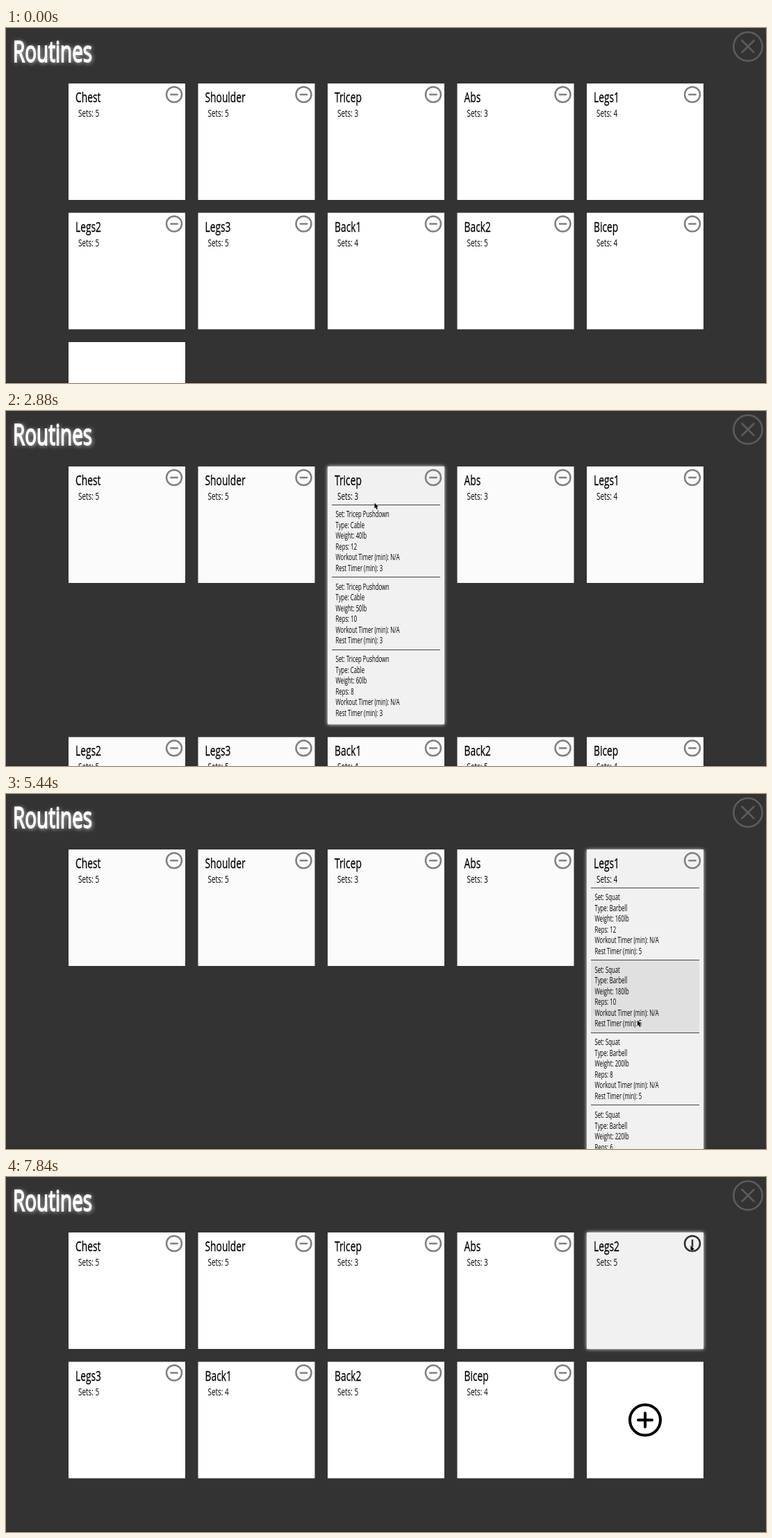
Write an HTML page with a canvas that moves like this. It is 1094 px wide and 512 px high and loops after 8 s.

```html
<!DOCTYPE html>
<html lang="en">
<head>
<meta charset="utf-8">
<title>Routines</title>
<style>
  html, body { margin: 0; width: 100%; height: 100%; overflow: hidden; background: #333; }
  canvas { display: block; }
</style>
</head>
<body>
<canvas id="stage" width="1094" height="512"></canvas>
<script>
const ctx = document.getElementById('stage').getContext('2d');
const LOOP = 8000, STEP = 80, REMOVED = 7840;
const LEFT = 90, TOP = 80, SIZE = 168, PITCH = 186.5, SET_TOP = 55, SET_PITCH = 104.6;
const CONDENSE = 0.664; // one narrow letterform for all text

const routine = (name, sets, exercise, type, weight, gain, rest) =>
  ({ name, sets, exercise, type, weight, gain, rest });
const routines = [
  routine('Chest', 5, 'Bench Press', 'Barbell', 70, 10, 3),
  routine('Shoulder', 5, 'Shoulder Press', 'Barbell', 40, 10, 3),
  routine('Tricep', 3, 'Tricep Pushdown', 'Cable', 40, 10, 3),
  routine('Abs', 3, 'Cable Crunch', 'Cable', 50, 10, 3),
  routine('Legs1', 4, 'Squat', 'Barbell', 160, 20, 5),
  routine('Legs2', 5), routine('Legs3', 5), routine('Back1', 4),
  routine('Back2', 5), routine('Bicep', 4),
  { add: true }
];

// Pointer moves between rests: first step, last step, x, y, easing power
const moves = [
  [640, 880, 246, 90, 0.3],
  [1120, 1200, 245, 88, 1],
  [1680, 1920, 330, 105, 3],
  [2640, 2880, 530, 132, 2.2],
  [3440, 3680, 740, 143, 1.24],
  [4240, 4480, 875, 150, 0.23],
  [4800, 5200, 906, 290, 1],
  [5360, 5680, 912, 380, 1],
  [6000, 6320, 914, 214, 0.35],
  [6400, 6800, 972, 114, 1],
  [6880, 7040, 985, 98, 1]
];

const clamp = v => Math.max(0, Math.min(1, v));

function pointer(t) {
  let x = 262, y = -30;
  for (const [first, last, toX, toY, power] of moves) {
    const k = clamp((t - first + STEP) / (last - first + STEP)) ** power;
    x += (toX - x) * k;
    y += (toY - y) * k;
  }
  return { x, y };
}

// Fades a hover test in and out over two steps
const soften = (t, delay, test) =>
  (test(pointer(t - delay)) + test(pointer(t - delay - STEP / 2))) / 2;

function cardUnder({ x, y }) {
  const column = Math.floor((x - LEFT) / PITCH);
  return y >= TOP && x - LEFT - column * PITCH <= SIZE ? column : -1;
}

function rect(x, y, w, h, color) {
  ctx.fillStyle = color;
  ctx.fillRect(x, y, w, h);
}

function text(str, x, y, size, color = '#000', bold = 0) {
  ctx.save();
  ctx.translate(x, y);
  ctx.scale(CONDENSE, 1);
  ctx.font = `${size}px "Open Sans", sans-serif`;
  ctx.fillStyle = ctx.strokeStyle = color;
  ctx.fillText(str, 0, 0);
  if (bold) {
    ctx.lineWidth = bold;
    ctx.shadowColor = 'transparent';
    ctx.strokeText(str, 0, 0);
  }
  ctx.restore();
}

// Ring holding bars of half length `arm` at the given angles
function ringIcon(x, y, radius, width, arm, color, angles) {
  ctx.strokeStyle = color;
  ctx.lineWidth = width;
  ctx.lineCap = 'round';
  ctx.beginPath();
  ctx.arc(x, y, radius, 0, Math.PI * 2);
  for (const a of angles) {
    const dx = Math.cos(a) * arm, dy = Math.sin(a) * arm;
    ctx.moveTo(x - dx, y - dy);
    ctx.lineTo(x + dx, y + dy);
  }
  ctx.stroke();
}

function drawSets(card, x, y, t) {
  for (let i = 0; i < card.sets; i++) {
    const top = y + SET_TOP + i * SET_PITCH;
    const shade = soften(t, 100, p => p.x > x && p.x < x + SIZE && p.y > top && p.y < top + SET_PITCH);
    rect(x + 6, top, 156, SET_PITCH, `rgba(0,0,0,${0.07 * shade})`);
    rect(x + 6, Math.floor(top), 156, 1, '#444');
    [
      `Set: ${card.exercise}`, `Type: ${card.type}`, `Weight: ${card.weight + i * card.gain}lb`,
      `Reps: ${12 - 2 * i}`, 'Workout Timer (min): N/A', `Rest Timer (min): ${card.rest}`
    ].forEach((line, k) => text(line, x + 11.5, top + 18.2 + k * 15.5, 11.7));
  }
}

function drawCard(card, x, y, height, color, hovered, t) {
  ctx.save();
  if (hovered) {
    ctx.shadowColor = '#fff';
    ctx.shadowBlur = 5;
  }
  rect(x, y, SIZE, height, color);
  ctx.restore();
  if (card.add) return ringIcon(x + 84, y + 84, 22, 4, 10, '#000', [0, Math.PI / 2]);
  const iconX = x + 152, iconY = y + 16;
  const hot = soften(t, 20, p => Math.abs(p.x - iconX) < 16 && Math.abs(p.y - iconY) < 16);
  text(card.name, x + 10, y + 27, 20.8, '#000', 0.3);
  text(`Sets: ${card.sets}`, x + 14, y + 48, 15);
  ringIcon(iconX, iconY, 11, 2.5, 4.7, `hsl(0,0%,${50 - 32 * hot}%)`, [hot * Math.PI / 2]);
}

function drawCards(t) {
  const removed = t >= REMOVED;
  const list = routines.filter(card => !removed || card.name !== 'Legs1');
  const hover = cardUnder(pointer(t - STEP / 2));
  const open = removed ? -1 : hover;
  const openHeight = open < 0 ? SIZE : SET_TOP + list[open].sets * SET_PITCH + 3;
  list.forEach((card, i) => {
    const row = Math.floor(i / 5);
    const x = LEFT + PITCH * (i % 5);
    const y = TOP + PITCH * row + (row ? openHeight - SIZE : 0);
    const color = i === hover ? '#f1f1f1' : open < 0 ? '#fff' : '#fbfbfb';
    drawCard(card, x, y, i === open ? openHeight : SIZE, color, i === hover, t);
    if (i === open) drawSets(card, x, y, t);
  });
}

function drawPointer({ x, y }) {
  ctx.save();
  ctx.translate(x, y);
  ctx.lineWidth = 1;
  ctx.strokeStyle = 'rgba(255,255,255,.75)';
  ctx.fillStyle = '#000';
  const arrow = new Path2D('M.5 .5V8.5L2.3 7 3.6 10 5 9.4 3.8 6.5 6 6.3Z');
  ctx.stroke(arrow);
  ctx.fill(arrow);
  ctx.restore();
}

function draw(now) {
  const t = Math.floor((now % LOOP) / STEP) * STEP;
  rect(0, 0, 1094, 512, '#333');
  rect(0, 510, 1094, 2, '#2d2d2d');
  ctx.save();
  ctx.shadowColor = '#fff';
  ctx.shadowBlur = 6;
  ctx.shadowOffsetX = ctx.shadowOffsetY = 1;
  text('Routines', 10, 49, 42, '#fff', 1.8);
  ctx.restore();
  ringIcon(1068, 26.7, 20.7, 2.6, 12, '#5c5c5c', [Math.PI / 4, -Math.PI / 4]);
  drawCards(t);
  drawPointer(pointer(t));
  requestAnimationFrame(draw);
}
requestAnimationFrame(draw);
</script>
</body>
</html>
```
